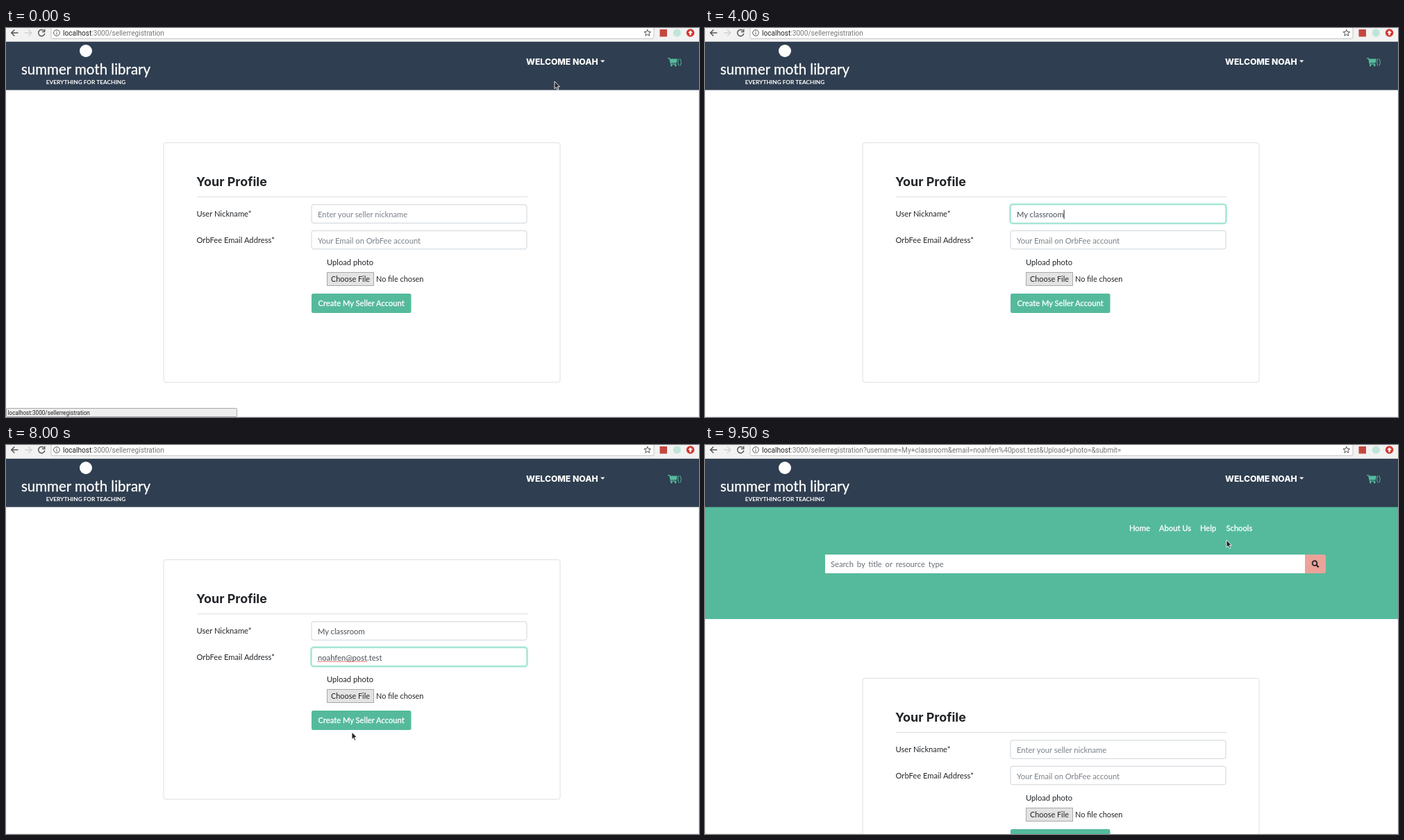
An HTML page that plays this animation: 998 by 561 pixels, repeating every 9750 ms.

```html
<!DOCTYPE html>
<html lang="en">
<head>
<meta charset="utf-8">
<title>Seller registration</title>
<style>
  html, body { margin: 0; width: 100%; height: 100%; overflow: hidden; background: #fff; }
  svg { display: block; width: 998px; height: 561px; }
  text { font: 11.2px Lato, sans-serif; fill: #212529; white-space: pre; }
  .bar text { font: 10.1px Roboto, sans-serif; fill: #777; }
  .bar .host { fill: #222; }
  text.status { font: 8.2px Roboto, sans-serif; fill: #222; }
  text.logo { font-size: 20.5px; fill: #fff; stroke: #fff; stroke-width: .3px; }
  text.tag { font-size: 8.3px; font-weight: 700; fill: #fff; }
  text.user { font: 800 12.2px Inter, sans-serif; fill: #fff; }
  text.title { font: 700 17.9px Inter, sans-serif; }
  text.strong { fill: #fff; stroke: #fff; stroke-width: .3px; }
  text.file { font-size: 10.9px; }
  .list text { font: 600 8.8px Inter, sans-serif; fill: #222; }
  .list rect { fill: #fff; stroke: #a9b9b5; }
  .field { fill: #fff; stroke: #ced4da; }
  .field.on { stroke: #86d9c3; }
  .glow { fill: none; stroke: #5fd9b8; stroke-opacity: .45; stroke-width: 2.5; }
  .value { fill: #495057; }
  .value.empty { fill: #7b8289; }
</style>
</head>
<body>
<svg viewBox="0 0 998 561">
  <rect width="998" height="561" fill="#fff"/>
  <path d="M.5 89V561M997.5 89V561M0 560.5H998" stroke="#f1f1f1"/>

  <g id="form">
    <rect x="227" y="165.5" width="571" height="345.5" rx="3" fill="#fff" stroke="#dfdfdf"/>
    <text class="title" x="274" y="228">Your Profile</text>
    <path d="M275 243.5H751" stroke="#dedede"/>
    <text x="274.5" y="272">User Nickname*</text>
    <text x="274.5" y="309.5">OrbFee Email Address*</text>
    <g id="nick"></g>
    <g id="mail"></g>
    <path id="spell" stroke="#e0453f" stroke-width="1.2" stroke-dasharray="1.3 1"/>
    <text x="462" y="342">Upload photo</text>
    <rect x="462.5" y="352.5" width="67" height="19" fill="#e3e3e3" stroke="#a9a9a9"/>
    <text class="file" x="468" y="366">Choose File</text>
    <text class="file" x="533" y="366">No file chosen</text>
    <rect id="btnGlow" class="glow" x="439.5" y="382.5" width="144.5" height="29" rx="3"/>
    <rect id="btn" x="440" y="383" width="143.5" height="28" rx="2.5"/>
    <text class="strong" x="449.5" y="401">Create My Seller Account</text>
    <g id="list" class="list"><rect x="440" y="281.5" width="310" height="100.5"/></g>
  </g>

  <g id="banner">
    <rect y="89" width="998" height="162" fill="#55ba9c"/>
    <g id="nav"></g>
    <rect x="173" y="158" width="691" height="27" fill="#fff"/>
    <text x="181" y="176" style="fill:#697078;word-spacing:2px">Search by title or resource type</text>
    <path d="M864 158H891a3 3 0 0 1 3 3V182a3 3 0 0 1-3 3H864Z" fill="#eba399"/>
    <g fill="none" stroke="#222"><circle cx="878" cy="170.5" r="3.4" stroke-width="1.8"/><path d="M880.5 173L883.6 176.2" stroke-width="2.3"/></g>
  </g>

  <rect y="20" width="998" height="69.5" fill="#2f3e50"/>
  <circle cx="115" cy="33" r="9" fill="#fff"/>
  <text class="logo" x="115" y="67" text-anchor="middle">summer moth library</text>
  <text class="tag" x="115" y="80.5" text-anchor="middle">EVERYTHING FOR TEACHING</text>
  <text class="user" x="749" y="53">WELCOME NOAH</text>
  <path d="M856 46.5H862.4L859.2 49.8Z" fill="#fff"/>
  <g fill="#55ba9c">
    <path d="M953 43H956L956.5 44.5H967L965.6 50.4H957.7L958 51.6H965.3V52.8H957L955.1 44.3H953Z"/>
    <circle cx="958.3" cy="54" r="1.4"/><circle cx="964.2" cy="54" r="1.4"/>
    <text x="966.7" y="53" style="font-size:12.2px;fill:#55ba9c">()</text>
  </g>

  <g class="bar">
    <rect width="998" height="20" fill="#f2f2f2"/>
    <path d="M0 19.5H998" stroke="#c4c7ca"/>
    <rect x="65" y="-6" width="868" height="21.3" rx="2" fill="#fff" stroke="#c3c3c3"/>
    <g fill="none" stroke="#555" stroke-width="1.5">
      <path d="M17.5 7H8M12.3 2.5L7.8 7L12.3 11.5"/>
      <path d="M27 7H36.5M32.2 2.5L36.7 7L32.2 11.5" stroke="#d2d2d2"/>
      <path id="reload" d="M54.5 3.7A4.6 4.6 0 1 0 55.8 8M55.7 1.8V5.6H51.9"/>
      <path id="stop" d="M47.3 3L55.2 11M55.2 3L47.3 11"/>
      <g stroke-width="1"><circle cx="73" cy="7" r="4.3"/><path d="M73 6.3V9.5M73 4.3V5.4"/></g>
      <path id="star" stroke-width="1"/>
    </g>
    <text x="82" y="10.5"><tspan class="host">localhost</tspan>:3000/sellerregistration<tspan id="query"></tspan></text>
    <rect id="ext1" x="941.5" y="2" width="10.5" height="10.5"/>
    <circle id="ext2" cx="966.3" cy="7" r="5.6"/>
    <circle cx="985.6" cy="7" r="5.8" fill="#d3382f"/>
    <path d="M985.6 3.4L989 7H986.9V10.3H984.3V7H982.2Z" fill="#fff"/>
  </g>

  <g id="status">
    <rect x=".5" y="548.5" width="332" height="12" rx="1.5" fill="#eee" stroke="#a8a8a8"/>
    <text class="status" x="2.5" y="557.8">localhost:3000/sellerregistration</text>
  </g>

  <g id="cursor">
    <path id="arrow" fill="#222" stroke="#fff" stroke-width=".9" d="M0 0V10.6L2.4 8.4L4.1 12.2L5.9 11.4L4.2 7.7H7.4Z"/>
    <path id="beam" fill="none" stroke="#222" stroke-width="1.1" d="M-2.3-6Q0-6 0-4.5Q0-6 2.3-6M0-4.5V4.5M-2.3 6Q0 6 0 4.5Q0 6 2.3 6M-1.5 1.5H1.5"/>
    <path id="hand" fill="#fff" stroke="#222" stroke-width=".9" d="M-1.3 5V-.3Q0-1.8 1.2-.3V3.2L5 4.1Q6.1 4.5 5.8 6L5 10.6H-.4L-3.6 6.3Q-3.3 4.7-1.3 6.8Z"/>
  </g>
</svg>
<script>
const LOOP = 9750, STEP = 250;
const $ = id => document.getElementById(id);
const show = (el, on) => el.setAttribute('visibility', on ? 'visible' : 'hidden');

function add(parent, tag, attrs, text = '') {
  const el = document.createElementNS('http://www.w3.org/2000/svg', tag);
  for (const key in attrs) el.setAttribute(key, attrs[key]);
  el.textContent = text;
  return parent.appendChild(el);
}

// Input box with placeholder, typed value, caret and focus ring
function makeField(id, y, hint) {
  const g = $(id);
  const glow = add(g, 'rect', { class: 'glow', x: 439.3, y: y - .8, width: 311.4, height: 28.1, rx: 4 });
  const box = add(g, 'rect', { x: 440, y, width: 310, height: 26.5, rx: 3 });
  const label = add(g, 'text', { x: 449, y: y + 18.3 });
  const caret = add(g, 'path', { stroke: '#222', 'stroke-width': 1 });
  return (value, focus, blink) => {
    show(glow, focus);
    box.setAttribute('class', focus ? 'field on' : 'field');
    label.setAttribute('class', value ? 'value' : 'value empty');
    label.textContent = value || hint;
    const end = 449.5 + (value ? label.getComputedTextLength() : 0);
    caret.setAttribute('d', `M${end} ${y + 7.5}v13`);
    show(caret, focus && blink);
    return label;
  };
}

const nick = makeField('nick', 254.8, 'Enter your seller nickname');
const mail = makeField('mail', 292.3, 'Your Email on OrbFee account');

['hanya', 'oran', 'Hanya', 'hanyamarrowenstokes@post.test', 'hanyamarrowen', 'oranfelton@post.test']
  .forEach((name, i) => add($('list'), 'text', { x: 446, y: 294.3 + i * 16.6 }, name));

[['Home', 611], ['About Us', 654], ['Help', 713], ['Schools', 750.5]]
  .forEach(([name, x]) => add($('nav'), 'text', { class: 'strong', x, y: 124 }, name));

$('star').setAttribute('d', 'M' + Array.from({ length: 10 }, (_, i) => {
  const a = i * Math.PI / 5, r = i % 2 ? 2.2 : 5;
  return `${923.8 + r * Math.sin(a)} ${7.2 - r * Math.cos(a)}`;
}).join('L') + 'Z');

const nickText = 'My classroom', mailText = 'noahfen@post.test';
const query = '?username=My+classroom&email=noahfen%40post.test&Upload+photo=&submit=';

// Each track: [start ms, value]
const nickTyped = [[0, 0], [1500, 1], [1750, 2], [2000, 3], [2250, 4], [2500, 6], [2750, 7], [3000, 9], [3250, 10], [3500, 12], [9250, 0]];
const mailTyped = [[0, 0], [4500, 1], [4750, 2], [5000, 4], [5250, 5], [5500, 6], [5750, 7], [6000, 8], [6250, 9], [6500, 10], [6750, 11], [7000, 13], [7250, 15], [7500, 17], [9250, 0]];
const focus = [[0, ''], [500, 'nick'], [4250, 'mail'], [9000, 'btn'], [9250, '']];
const lists = [[0, null], [750, 0], [1500, null], [4250, 37.5], [4500, null]];
const pointer = [
  [0, ['arrow', 790, 77]], [250, ['arrow', 640, 180]],
  [500, ['beam', 506, 267]], [1500, ['']],
  [7750, ['arrow', 506, 412]], [8000, ['arrow', 498, 414]],
  [8250, ['hand', 501, 404]], [8500, ['hand', 502, 402.5]],
  [9250, ['arrow', 640, 260]], [9500, ['arrow', 751, 137]]
];
const at = (track, t) => track.filter(s => s[0] <= t).pop()[1];

function draw(t) {
  const done = t >= 9250, loading = t >= 9000 && !done;
  const active = at(focus, t);
  const blink = ![3500, 5000, 8000].includes(t);

  nick(nickText.slice(0, at(nickTyped, t)), active === 'nick', blink);
  const label = mail(mailText.slice(0, at(mailTyped, t)), active === 'mail', blink);
  const spell = t >= 7500 && t < 9000;
  show($('spell'), spell);
  if (spell) $('spell').setAttribute('d', `M449 312.3h${label.getSubStringLength(0, 12)}`);

  const drop = at(lists, t);
  show($('list'), drop !== null);
  $('list').setAttribute('transform', `translate(0 ${drop || 0})`);

  const hover = t >= 8250 && !done;
  $('btn').setAttribute('fill', hover ? '#409176' : '#55ba9c');
  show($('btnGlow'), active === 'btn');

  $('form').setAttribute('transform', `translate(0 ${done ? 171 : 0})`);
  show($('banner'), done);
  show($('status'), t < 250);
  show($('stop'), loading);
  show($('reload'), !loading);
  $('query').textContent = t >= 9000 ? query : '';
  $('ext1').setAttribute('fill', loading ? '#e4e4e4' : '#c4473f');
  $('ext2').setAttribute('fill', loading ? '#ececec' : '#bfe5d9');

  const [shape, x = 0, y = 0] = at(pointer, t);
  ['arrow', 'beam', 'hand'].forEach(id => show($(id), id === shape));
  $('cursor').setAttribute('transform', `translate(${x} ${y})`);
}

const start = performance.now();
let last = -1;
function tick() {
  const t = Math.floor((performance.now() - start) % LOOP / STEP) * STEP;
  if (t !== last) draw(last = t);
  requestAnimationFrame(tick);
}
tick();
</script>
</body>
</html>
```
